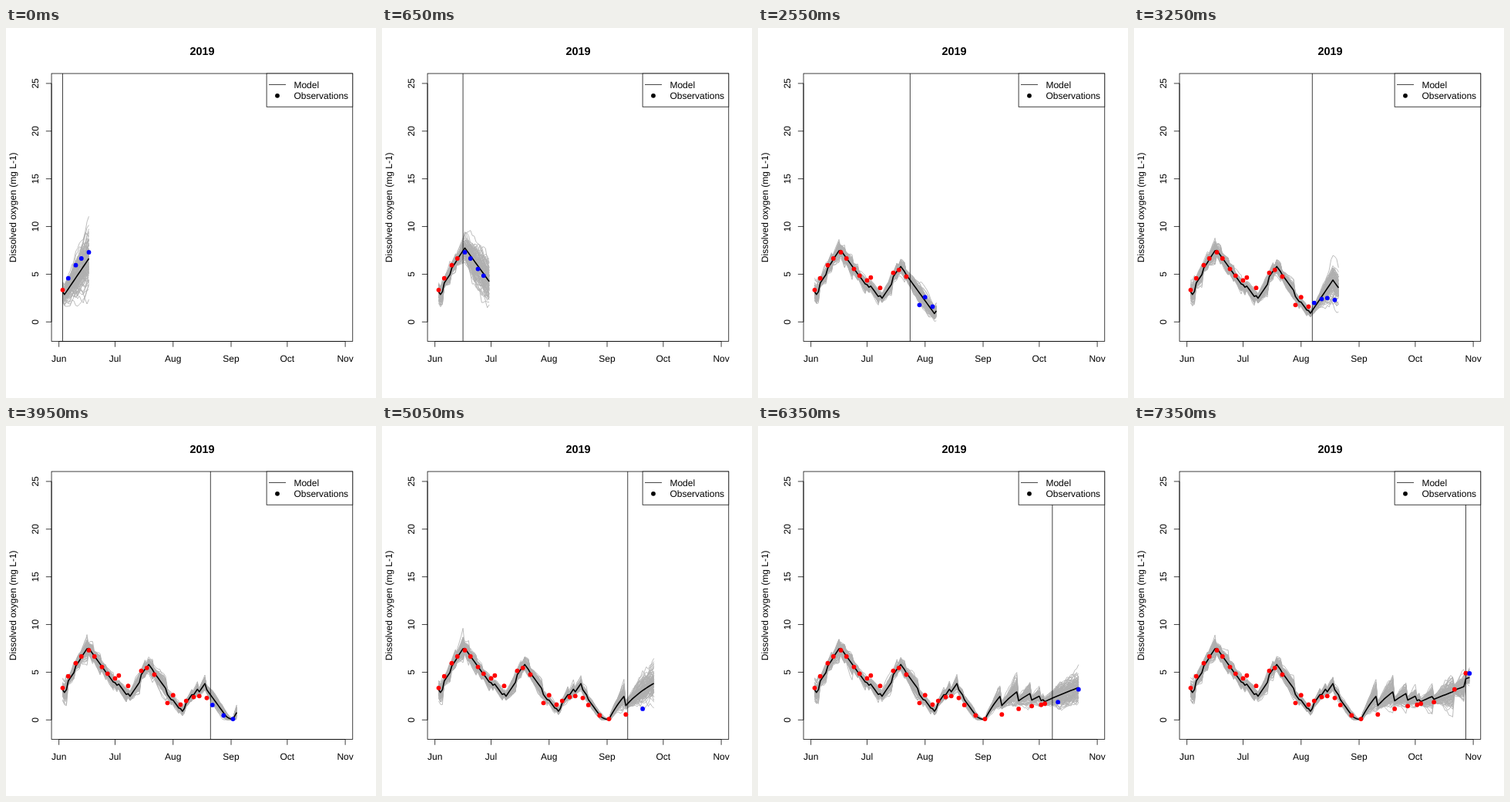
An HTML page with a canvas that plays this animation: 480 px wide and 480 px high, repeating every 7400 ms.

```html
<!DOCTYPE html>
<html lang="en">
<head>
<meta charset="utf-8">
<title>Dissolved oxygen forecast</title>
<style>
  html, body { margin: 0; width: 100%; height: 100%; overflow: hidden; background: #fff; }
  canvas, svg { position: absolute; left: 0; top: 0; }
  text { font: 12px "Liberation Sans", Arial, sans-serif; text-rendering: geometricPrecision; }
  .title { font-size: 14.4px; font-weight: bold; }
  .mid { text-anchor: middle; }
  .line { fill: none; stroke: #000; stroke-width: 0.75; }
</style>
</head>
<body>
<canvas width="480" height="480"></canvas>
<svg width="480" height="480">
  <rect class="line" x="59.04" y="59.04" width="390.72" height="347.52"/>
  <path id="axes" class="line"/>
  <text class="title mid" x="254.4" y="35">2019</text>
  <text class="mid" transform="translate(13 232.8) rotate(-90)">Dissolved oxygen (mg L-1)</text>
  <g id="labels"></g>
  <rect class="line" x="338.1" y="59.04" width="111.66" height="43.2" style="fill: #fff"/>
  <path class="line" d="M341 73.44H363"/>
  <circle cx="352" cy="87.84" r="2.9"/>
  <text x="373.4" y="77.9">Model</text>
  <text x="373.4" y="92.4">Observations</text>
</svg>
<script>
const FIRST = 2, LAST = 151, HORIZON = 14, FRAME_MS = 50, MEMBERS = 100;
const AUTUMN = 93;
const px = day => 68.65 + day * 2.428;
const py = value => 381.31 - value * 12.376;

// Measurements: day since 1 June -> mg/L.
const observed = new Map([
  [2, 3.35], [5, 4.58], [9, 5.95], [12, 6.65], [16, 7.3], [19, 6.65], [23, 5.55], [26, 4.85],
  [30, 4.35], [32, 4.65], [37, 3.57], [44, 5.15], [47, 5.45], [51, 4.75], [58, 1.78], [61, 2.6],
  [65, 1.6], [68, 2], [72, 2.4], [75, 2.5], [79, 2.3], [82, 1.57], [88, 0.47], [93, 0.1],
  [102, 0.57], [111, 1.16], [118, 1.45], [123, 1.58], [125, 1.7], [132, 1.87], [143, 3.2],
  [149, 4.9], [151, 4.88]
]);

// Oxygen alternately falls and rises between these days, then recovers slowly in autumn.
const turns = [3, 16, 38, 48, 66, 78, AUTUMN];

function trend(day) {
  if (day > AUTUMN) return 0.07 + 0.33 * Math.exp((AUTUMN - day) / 12);
  return turns.filter(t => t < day).length % 2 ? 0.29 : -0.27;
}

// Ensemble mean: a daily model step, pulled towards each measurement up to today.
function simulate(today, end) {
  const mean = [], spread = [];
  let value = 3.15, lastObs = FIRST - 7;
  for (let d = FIRST; d <= end; d++) {
    if (d > FIRST) {
      const step = trend(d);
      value = Math.max(value + step, value * 0.6);
      if (d <= today && observed.has(d)) {
        value += (step > 0 ? 0.56 : 0.3) * (observed.get(d) - value);
        lastObs = d;
      }
    }
    const growth = (d > AUTUMN ? 0.025 : 0.012) * (d - lastObs);
    mean[d] = value;
    spread[d] = Math.min(0.15, value / 2) + value * Math.min(0.2, 0.02 + growth);
  }
  return { mean, spread };
}

function random(seed) {
  return () => {
    seed = seed + 0x6D2B79F5 | 0;
    let t = Math.imul(seed ^ seed >>> 15, 1 | seed);
    t = t + Math.imul(t ^ t >>> 7, 61 | t) ^ t;
    return ((t ^ t >>> 14) >>> 0) / 4294967296;
  };
}

const ctx = document.querySelector("canvas").getContext("2d");
ctx.lineJoin = "round";

function stroke(color, width, points) {
  ctx.beginPath();
  points.forEach(([x, y]) => ctx.lineTo(x, y));
  ctx.strokeStyle = color;
  ctx.lineWidth = width;
  ctx.stroke();
}

function draw(frame) {
  const today = FIRST + frame, end = Math.min(LAST, today + HORIZON);
  const { mean, spread } = simulate(today, end);
  const rnd = random(frame * 7919 + 17);
  const normal = () => (rnd() + rnd() + rnd() - 1.5) * 2;

  ctx.clearRect(0, 0, 480, 480);
  for (let m = 0; m < MEMBERS; m++) {
    let z = normal();
    const member = [];
    for (let d = FIRST; d <= end; d++) {
      const keep = d <= today && observed.has(d) ? 0.4 : 0.95;
      z = keep * z + Math.sqrt(1 - keep * keep) * normal();
      member.push([px(d), py(Math.max(0.02, mean[d] + spread[d] * z))]);
    }
    stroke("#b0b0b0", 0.85, member);
  }
  stroke("#000", 1.6, mean.map((v, d) => [px(d), py(v)]));
  stroke("#000", 0.75, [[px(today), 59.04], [px(today), 406.56]]);
  for (const [d, v] of observed) {
    if (d > end) break;
    ctx.fillStyle = d <= today ? "#f00" : "#00f";
    ctx.beginPath();
    ctx.arc(px(d), py(v), 2.9, 0, 7);
    ctx.fill();
  }
}

function drawAxes() {
  let path = `M${px(0)} 406.56H${px(153)}M59.04 ${py(0)}V${py(25)}`, labels = "";
  ["Jun", "Jul", "Aug", "Sep", "Oct", "Nov"].forEach((name, i) => {
    const x = px((Date.UTC(2019, 5 + i) - Date.UTC(2019, 5)) / 864e5);
    path += `M${x} 406.56v7.2`;
    labels += `<text class="mid" x="${x}" y="432.5">${name}</text>`;
  });
  for (let v = 0; v <= 25; v += 5) {
    path += `M59.04 ${py(v)}h-7.2`;
    labels += `<text class="mid" transform="translate(41.8 ${py(v)}) rotate(-90)">${v}</text>`;
  }
  document.getElementById("axes").setAttribute("d", path);
  document.getElementById("labels").innerHTML = labels;
}

drawAxes();
const frames = LAST - FIRST - 1;
const start = performance.now();
let shown = -1;
function tick() {
  const frame = Math.floor((performance.now() - start) / FRAME_MS) % frames;
  if (frame !== shown) draw(shown = frame);
  requestAnimationFrame(tick);
}
tick();
</script>
</body>
</html>
```
